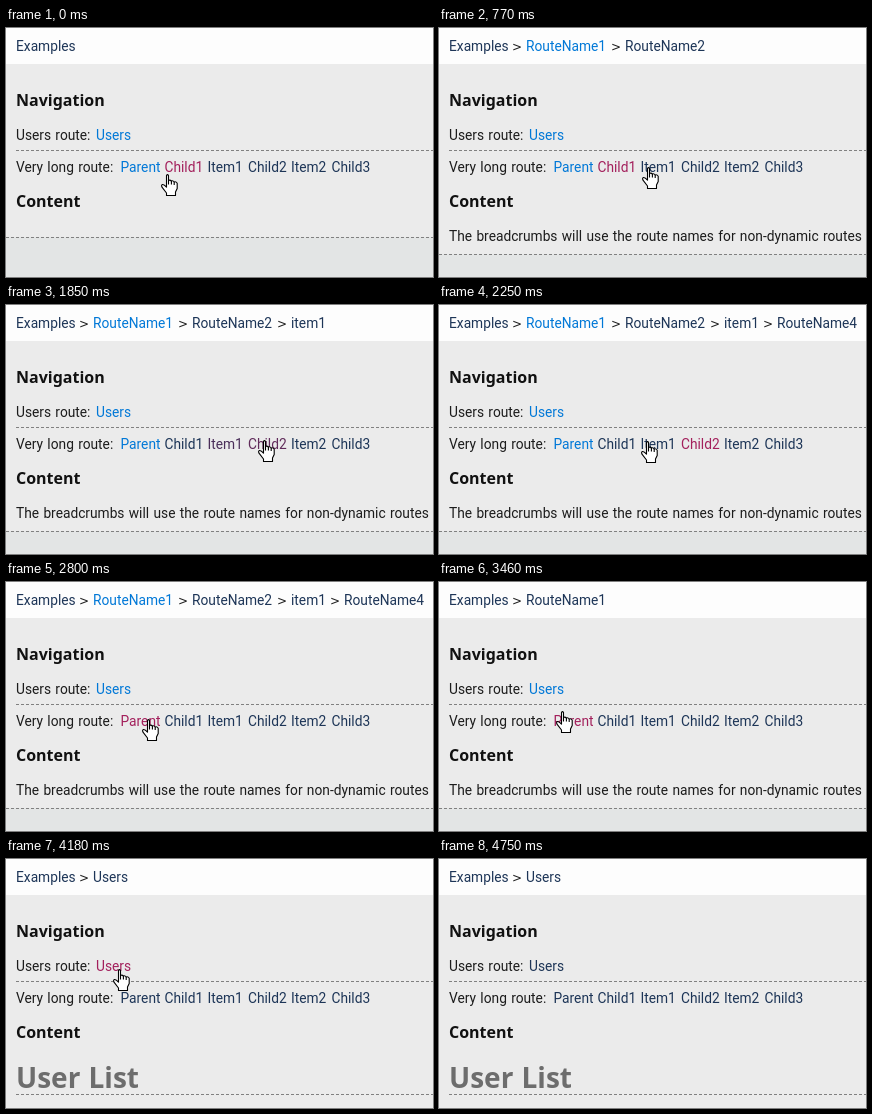
Write an HTML page with a canvas that moves like this. It is 427 by 249 pixels and loops after 5.14 s.

```html
<!DOCTYPE html>
<html lang="en">
<head>
<meta charset="utf-8">
<title>Breadcrumbs</title>
<style>
html, body { margin: 0; width: 100%; height: 100%; overflow: hidden; background: #ebebeb; }
canvas { display: block; }
</style>
</head>
<body>
<canvas id="stage"></canvas>
<script>
const W = 427, H = 249, LOOP = 5140;
const BLUE = '#0078d7', NAVY = '#1d3557', PINK = '#a3205c', INK = '#1c1c1c';
const BODY = '13.75px Roboto, sans-serif';
const CHEVRON = '12px "DejaVu Sans", sans-serif';
const TITLE = 'bold 16px "Noto Sans", sans-serif';
const HERO = 'bold 28px "Noto Sans", sans-serif';

const canvas = document.getElementById('stage');
const ctx = canvas.getContext('2d');
const scale = window.devicePixelRatio || 1;
canvas.width = W * scale;
canvas.height = H * scale;
canvas.style.width = W + 'px';
canvas.style.height = H + 'px';
ctx.scale(scale, scale);
ctx.wordSpacing = '0.9px';

// Last [time, ...value] entry that has begun.
const at = (track, t) => track.reduce((found, key) => key[0] <= t ? key : found);

function mix(a, b, k) {
  const part = (c, i) => parseInt(c.slice(i, i + 2), 16);
  return 'rgb(' + [1, 3, 5].map(i => Math.round(part(a, i) + (part(b, i) - part(a, i)) * k)) + ')';
}

// A colour change spread over the given moments.
const fade = (from, to, ...times) =>
  times.map((time, i) => [time, mix(from, to, (i + 1) / times.length)]);

const links = [
  ['Users', 90, 112, [[0, BLUE], ...fade(BLUE, PINK, 4030), ...fade(PINK, NAVY, 4450, 4600)]],
  ['Parent', 114.5, 144, [[0, BLUE], ...fade(BLUE, PINK, 2550, 2680, 2800), ...fade(PINK, NAVY, 3610, 3760, 3880)]],
  ['Child1', 158.5, 144, [[0, PINK], ...fade(PINK, NAVY, 920, 1050, 1170)]],
  ['Item1', 201.5, 144, [[0, NAVY], ...fade(NAVY, PINK, 920, 1050, 1170), ...fade(PINK, NAVY, 1730, 1850, 1970)]],
  ['Child2', 242, 144, [[0, NAVY], ...fade(NAVY, PINK, 1850, 1970), ...fade(PINK, NAVY, 2400, 2550, 2680)]],
  ['Item2', 285, 144, [[0, NAVY]]],
  ['Child3', 325.5, 144, [[0, NAVY]]]
];

const crumbX = [87, 186, 285, 338];
const crumbs = [
  [0, []],
  [530, ['RouteName1', 'RouteName2']],
  [1050, ['RouteName1', 'RouteName2', 'item1']],
  [2120, ['RouteName1', 'RouteName2', 'item1', 'RouteName4']],
  [2950, ['RouteName1']],
  [4180, ['Users']]
];

const pointer = [
  [0, 155, 146], [640, 180, 143], [770, 203, 139],
  [1460, 229, 137], [1590, 229, 130], [1730, 240, 131], [1850, 252, 135], [1970, 258, 136],
  [2250, 202, 136], [2400, 162, 137], [2550, 146, 137], [2680, 138, 137], [2800, 136, 137],
  [3200, 134, 137], [3340, 126, 133], [3460, 117, 129], [3610, 116, 117],
  [3760, 110, 112], [3880, 107, 110],
  [4450, 274, 186, 'arrow'], [4600, 321, 210, 'arrow'], [4750, 0, 0, 'none']
];

const hand = new Path2D('M5.5 1.5 Q6.5 -.2 7.5 1.5 V6.5 Q9 5.5 10.4 7 Q12 6.2 13.2 8 Q15 7.3 16.2 9.2' +
  ' V14.5 L14.5 18 V21.5 H5.5 V19 L1 13.2 Q0 11 1.5 10.5 Q3 10.2 5.5 13.2 Z');
const fingers = new Path2D('M7.5 6.5 V10.5 M10.4 7 V10.5 M13.2 8 V11');
const arrow = new Path2D('M.5 .5 V16 L4 12.6 L6.5 18.4 L9 17.3 L6.5 11.7 H11.5 Z');

function text(value, x, y, color = INK, font = BODY) {
  ctx.font = font;
  ctx.fillStyle = color;
  ctx.fillText(value, x, y);
}

function dashes(x, y) {
  ctx.strokeStyle = '#808080';
  ctx.lineWidth = 1;
  ctx.setLineDash([3, 2]);
  ctx.beginPath();
  ctx.moveTo(x, y + 0.5);
  ctx.lineTo(W, y + 0.5);
  ctx.stroke();
  ctx.setLineDash([]);
}

function drawCrumbs(t) {
  const names = at(crumbs, t)[1];
  text('Examples', 10, 23, NAVY);
  names.forEach((name, i) => {
    text('>', crumbX[i] - 14, 23, INK, CHEVRON);
    text(name, crumbX[i], 23, i === 0 && names.length > 1 ? BLUE : NAVY);
  });
}

function drawContent(t) {
  if (t >= 4180) {
    text('User List', 10, 229, '#6d6d6d', HERO);
    dashes(10, 235);
    return;
  }
  const edge = t < 530 ? 209 : 226;
  ctx.fillStyle = '#e3e5e5';
  ctx.fillRect(0, edge, W, H - edge);
  dashes(0, edge);
  if (t >= 530) text('The breadcrumbs will use the route names for non-dynamic routes', 10, 213);
}

function drawPointer(t) {
  const [, x, y, kind = 'hand'] = at(pointer, t);
  if (kind === 'none') return;
  const shape = kind === 'hand' ? hand : arrow;
  ctx.save();
  ctx.translate(x, y);
  ctx.lineWidth = 1.1;
  ctx.lineJoin = 'round';
  ctx.fillStyle = '#fff';
  ctx.strokeStyle = '#000';
  ctx.fill(shape);
  ctx.stroke(shape);
  if (kind === 'hand') ctx.stroke(fingers);
  ctx.restore();
}

function draw(t) {
  ctx.fillStyle = '#ebebeb';
  ctx.fillRect(0, 0, W, H);
  ctx.fillStyle = '#fdfdfd';
  ctx.fillRect(0, 0, W, 36);
  drawCrumbs(t);
  text('Navigation', 10, 78, '#111', TITLE);
  text('Content', 10, 179, '#111', TITLE);
  text('Users route:', 10, 112);
  text('Very long route:', 10, 144);
  dashes(10, 122);
  for (const [label, x, y, colors] of links) text(label, x, y, at(colors, t)[1]);
  drawContent(t);
  drawPointer(t);
}

const start = performance.now();
function tick() {
  draw((performance.now() - start) % LOOP);
  requestAnimationFrame(tick);
}
tick();
</script>
</body>
</html>
```
